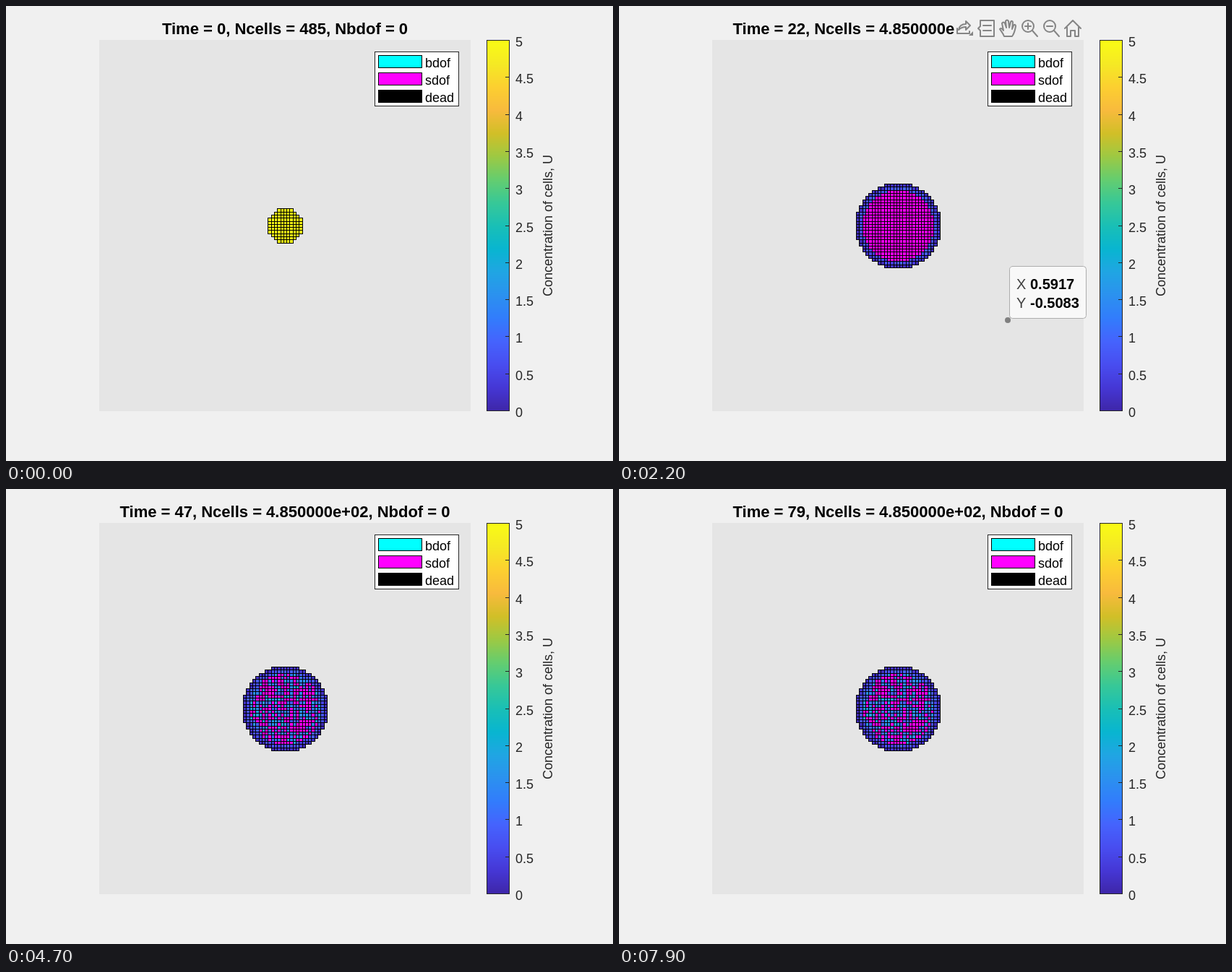
These frames come from a looping animation (840 by 630 pixels, 8 s). An HTML page with a canvas:

```html
<!DOCTYPE html>
<html lang="en">
<head>
<meta charset="utf-8">
<title>Cell concentration</title>
<style>
html, body { margin: 0; width: 840px; height: 630px; overflow: hidden; background: #f0f0f0; }
canvas { display: block; }
</style>
</head>
<body>
<canvas id="stage" width="840" height="630"></canvas>
<script>
const ctx = document.getElementById('stage').getContext('2d');
const FONT = '"Liberation Sans", Arial, sans-serif';
const CX = 386, CY = 304, CELL = 257 / 60;
const PARULA = ['3e26a8', '4537d5', '484df0', '4563fd', '327cfc', '2b91ef', '20a5e3', '08b5d0', '19bfb6',
  '37c897', '64cd6f', '9dc943', 'd1bf27', 'f8ba3d', 'fccf30', 'f5e924', 'f9fb15']
  .map(h => [0, 2, 4].map(k => parseInt(h.slice(k, k + 2), 16)));

function colour(u) {
  const p = Math.min(u / 5, 1) * 16, k = Math.min(Math.floor(p), 15);
  return `rgb(${PARULA[k].map((c, n) => Math.round(c + (PARULA[k + 1][n] - c) * (p - k)))})`;
}

function rect(x, y, w, h, fill) {
  ctx.fillStyle = fill;
  ctx.fillRect(x, y, w, h);
}

function box(x, y, w, h, fill, edge) {
  rect(x, y, w, h, edge);
  rect(x + 1, y + 1, w - 2, h - 2, fill);
}

function text(str, x, y, size, fill = '#262626', weight = '', align = 'left') {
  ctx.font = `${weight} ${size}px ${FONT}`;
  ctx.textAlign = align;
  ctx.fillStyle = fill;
  ctx.fillText(str, x, y);
}

function hash(i, j) {
  const v = Math.sin(i * 127.1 + j * 311.7 + 17) * 43758.5453;
  return v - Math.floor(v);
}

function colourbar() {
  box(665, 47, 32, 514, '#fff', '#262626');
  for (let y = 48; y < 560; y++) rect(666, y, 30, 1, colour((560 - y) / 512 * 5));
  for (let v = 0; v <= 10; v++) {
    const y = 560 - v * 51.3;
    rect(691, Math.round(y), 6, 1, '#262626');
    text(v / 2, 705, Math.round(y) + 9, 18);
  }
  ctx.save();
  ctx.translate(756, CY);
  ctx.rotate(-Math.PI / 2);
  text('Concentration of cells, U', 0, 0, 18, '#262626', '', 'center');
  ctx.restore();
}

function legend() {
  box(510, 63, 117, 76, '#fff', '#262626');
  [['bdof', '#0ff'], ['sdof', '#f0f'], ['dead', '#000']].forEach(([name, fill], k) => {
    box(515, 68 + 24 * k, 61, 18, fill, '#000');
    text(name, 580, 85 + 24 * k, 18, '#000');
  });
}

// The colony spreads quickly, rests, then breaks into a mottled state.
function colony(step) {
  const limit = 30 + 160 * (1 - Math.exp(-step / 2.5));
  const inside = (i, j) => i * i + j * j < limit;
  const age = Math.max(0, Math.min(step, 44) - 29);
  const mottle = 0.52 * Math.min(1, age / 6);

  function fill(i, j) {
    if (step === 0) return colour(5);
    const h = hash(i, j);
    const rim = !(inside(i + 1, j) && inside(i - 1, j) && inside(i, j + 1) && inside(i, j - 1));
    if (rim) return colour(0.05 + h * 0.25);
    if (i * i + j * j > limit * 0.71) return colour(0.35 + h * 0.6);
    const n = (h + hash(j + 40, i) * age / 15) % 1;
    return n < mottle ? colour(0.75 + hash(i + 60, j) * 1.1) : '#f0f';
  }

  const edge = (c, k) => Math.round(c + (k - 0.5) * CELL);
  for (let j = -13; j <= 13; j++) {
    for (let i = -13; i <= 13; i++) {
      if (!inside(i, j)) continue;
      const x = edge(CX, i), y = edge(CY, j);
      box(x, y, edge(CX, i + 1) - x + 1, edge(CY, j + 1) - y + 1, fill(i, j), '#000');
    }
  }
}

function toolbar() {
  rect(464, 18, 180, 29, '#f0f0f0');
  ctx.strokeStyle = ctx.fillStyle = '#858585';
  ctx.lineWidth = 2;
  ctx.lineJoin = ctx.lineCap = 'round';
  const draw = d => ctx.stroke(new Path2D(d));
  draw('M468 31v7h17v-3M470 33c1-6 5-8 10-8v-4l6 6-6 6v-4c-4 0-7 1-10 4');
  ctx.fill(new Path2D('M484 41h6v-6z'));
  draw('M500 20h19v22h-19v-8l-3-3 3-3zM504 27h11M504 34h11');
  draw('M533 42c-2-5-4-7-6-10 1-2 3-1 5 2l-2-10c1-2 3-2 4 0l2 6-1-9c1-2 3-2 4 0l1 9 2-8c1-2 3-1 3 1l-1 9 2-5c1-2 3-1 3 1-1 6-2 10-5 14z');
  for (const x of [566, 596]) {
    draw(`M${x + 8} 28a8 8 0 1 1-16 0a8 8 0 1 1 16 0M${x + 6} 34l7 8M${x - 4} 28h8`);
  }
  draw('M566 24v8M617 31l11-11 11 11M620 29v13h5v-8h6v8h5v-13');
}

function dataTip() {
  ctx.beginPath();
  ctx.roundRect(540.5, 360.5, 106, 72, 4);
  ctx.fillStyle = '#f8f8f8';
  ctx.fill();
  ctx.strokeStyle = '#adadad';
  ctx.lineWidth = 1;
  ctx.stroke();
  [['X', '0.5917', 392], ['Y', '-0.5083', 418]].forEach(([axis, value, y]) => {
    text(axis, 550, y, 20, '#404040');
    text(value, 569, y, 20, '#000', 'bold');
  });
  ctx.beginPath();
  ctx.arc(538, 435, 4, 0, 7);
  ctx.fillStyle = '#808080';
  ctx.fill();
}

function render(step) {
  rect(0, 0, 840, 630, '#f0f0f0');
  rect(129, 47, 514, 514, '#e5e5e5');
  const count = step ? '4.850000e+02' : '485';
  text(`Time = ${step}, Ncells = ${count}, Nbdof = 0`, CX, 39, 22, '#000', 'bold', 'center');
  colourbar();
  legend();
  colony(step);
  if (step >= 5 && step < 23) {
    toolbar();
    dataTip();
  }
}

let start, shown = -1;
function tick(now) {
  start ??= now;
  const step = Math.floor((now - start) / 100) % 80;
  if (step !== shown) render(shown = step);
  requestAnimationFrame(tick);
}
render(0);
requestAnimationFrame(tick);
</script>
</body>
</html>
```
